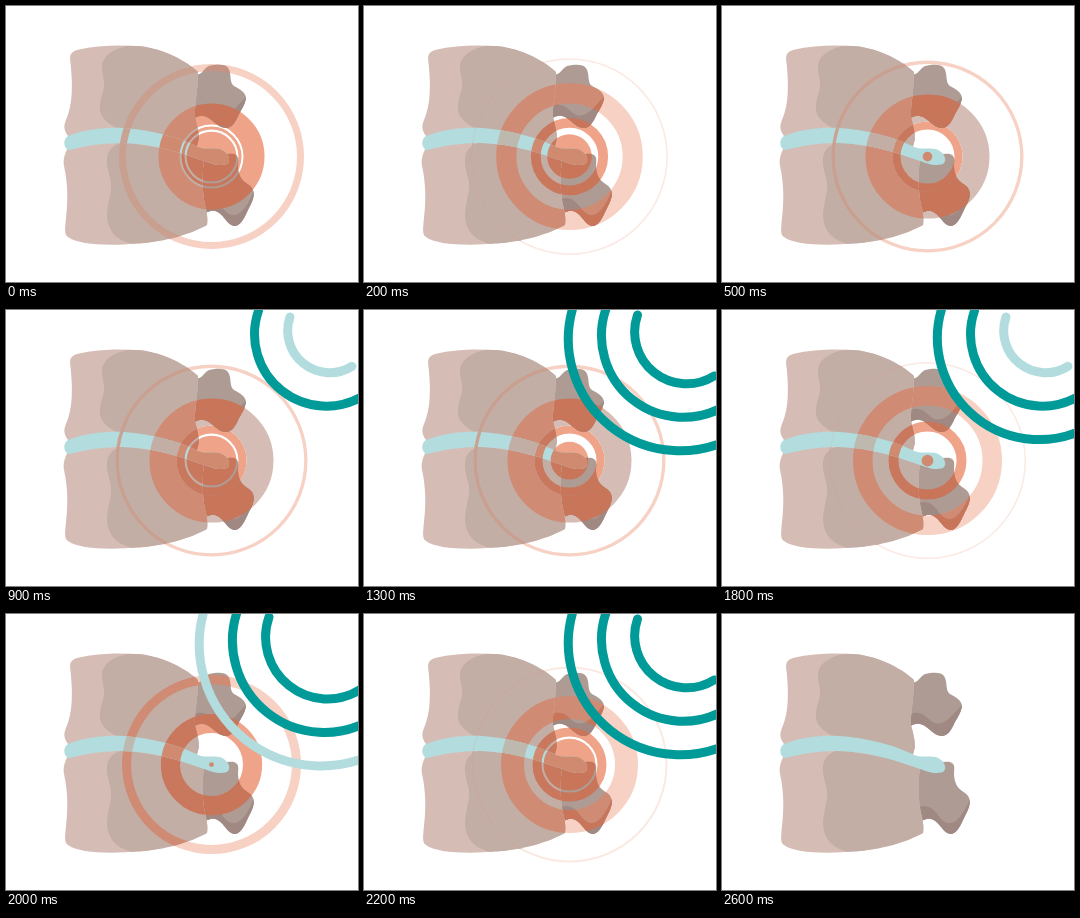
An HTML page that plays this animation: 352 by 276 pixels, repeating every 4.6 s.

```html
<!DOCTYPE html>
<html lang="en">
<head>
<meta charset="utf-8">
<title>Spine pain waves</title>
<style>
html, body { margin: 0; width: 100%; height: 100%; overflow: hidden; background: #fff; }
svg { display: block; width: 100%; height: 100%; }
</style>
</head>
<body>
<svg id="stage" viewBox="0 0 352 276">
  <defs>
    <path id="upper" d="M64 52Q64 46 71 44C92 39 112 39 130 40C153 41 178 53 192 66C192 86 188 102 189 111C191 118 193 126 193 133L190 144H64L62 130C57 123 58 119 60 114C67 98 67 78 64 52Z"/>
    <path id="lower" d="M64 138C58 148 57 154 58 160C62 178 62 195 60 212C59 222 58 229 62 231C72 239 104 240 130 237.5C160 236.5 186 227 201 219C202 213 201 207 199 199C196 185 196 168 198 154L190 143L118 130Z"/>
    <path id="upperProc" d="M186 69C197 70 197 63 203 60C212 58 219 58 222 62C226 68 223 77 228 80C234 83 240 87 240 92C239 99 235 104 232 110C229 117 225 122 220 122C211 122 207 112 198 110C192 109 190 112 186 113Z"/>
    <path id="lowerProc" d="M193 155L213 153C216 149 223 147 228 148C234 150 232 155 232 161C233 172 237 175 243 179C249 183 249 190 245 198C240 207 237 218 230 220C221 221 218 207 209 205C204 204 202 207 197 207Z"/>
    <path id="upperShade" d="M186 101C198 95 204 103 209 107C222 116 231 99 241 90V125H186Z"/>
    <path id="lowerShade" d="M193 195C204 188 211 194 216 201C227 217 239 209 249 182V222H193Z"/>
    <path id="disc" d="M62 130C80 123 100 121 118 122C145 124 168 130 188 139C198 145 206 141 214 143C222 146 226 154 221 158C213 161 204 157 198 155C175 147 150 138 116 137C96 137 78 140 64 144C58 144 56 134 62 130Z"/>
    <clipPath id="procClip"><use href="#upperProc"/><use href="#lowerProc"/></clipPath>
    <clipPath id="shadeClip" clip-path="url(#procClip)"><use href="#upperShade"/><use href="#lowerShade"/></clipPath>
    <clipPath id="bodyClip"><use href="#upper"/><use href="#lower"/></clipPath>
    <clipPath id="discClip"><use href="#disc"/></clipPath>
  </defs>
  <g id="onWhite"></g>
  <g fill="#ae9b93"><use href="#upperProc"/><use href="#lowerProc"/></g>
  <g id="onProc" clip-path="url(#procClip)"></g>
  <g clip-path="url(#procClip)" fill="#a08983"><use href="#upperShade"/><use href="#lowerShade"/></g>
  <g id="onShade" clip-path="url(#shadeClip)"></g>
  <g fill="#d5bdb5"><use href="#upper"/><use href="#lower"/></g>
  <g clip-path="url(#bodyClip)" fill="#c3aea6">
    <path d="M133 38C112 40 96 48 96 61C96 69 99 76 98 82C96 90 93 96 94 104C95 112 102 118 114 124L200 146V38Z"/>
    <path d="M118 136C104 139 100 147 101 158C102 168 106 174 105 183C104 192 101 200 101 210C102 224 109 236 133 239L204 224V150Z"/>
  </g>
  <g id="onBody" clip-path="url(#bodyClip)"></g>
  <use href="#disc" fill="#b2dcde"/>
  <g id="onDisc" clip-path="url(#discClip)"></g>
  <g id="signal" fill="none" stroke-width="9" stroke-linecap="round"></g>
</svg>
<script>
const LOOP = 4600, STEP = 100, LAST = 26;
const NS = "http://www.w3.org/2000/svg";
const TEAL = "#009a98", PALE = "#b2dcde";

// Wave colours on each surface.
const surfaces = {
  onWhite: { strong: "#efa388", dull: "#d5bdb5", soft: "#f7d1c4", thin: "#f7d1c4", faint: "#fbe9e3" },
  onProc: { strong: "#c8755a", dull: "#c8755a", soft: "#cf8b74", thin: "#c49383", faint: "#b39d94" },
  onShade: { strong: "#c8755a", dull: "#c8755a", soft: "#c8755a", thin: "#c49383", faint: "#a98f87" },
  onBody: { strong: "#c9785e", first: "#cf8b74", dull: "#cf8b74", soft: "#cf8b74", thin: "#c99f90", faint: "#c6aaa0" },
  onDisc: { strong: "#d08a70", dull: "#c3aea6", soft: "#bdb9af", thin: "#c9a294", faint: "#b8d4d3" }
};

// Step, wave progress (6 per wave), dot progress (1 per pulse).
const tempo = [
  [0, 0, 0.92], [5, 7, 3.18], [9, 13, 4.92], [13, 19, 6.7],
  [18, 27, 9.22], [22, 32, 10.96], [25, 35.5, 12.3]
];

// Wave age, outer radius, inner radius.
const growth = [
  [0, 30, 27], [1, 35, 27], [2, 37, 28], [3, 39, 29], [6, 53, 32], [7, 62, 35],
  [8, 68.5, 45.5], [9, 74.5, 55], [12, 92.5, 85.5], [13, 96, 92.7], [14, 98, 96], [15, 98.5, 97]
];

function add(parent, tag, attrs = {}) {
  const el = document.createElementNS(NS, tag);
  set(el, attrs);
  return parent.appendChild(el);
}

function set(el, attrs) {
  for (const name in attrs) el.setAttribute(name, attrs[name]);
}

function sample(keys, x) {
  let i = 1;
  while (i < keys.length - 1 && keys[i][0] < x) i++;
  const [a, b] = [keys[i - 1], keys[i]];
  const p = Math.min(1, (x - a[0]) / (b[0] - a[0]));
  return a.slice(1).map((v, n) => v + (b[n + 1] - v) * p);
}

const layers = Object.entries(surfaces).map(([id, colors]) => {
  const group = document.getElementById(id);
  const rings = Array.from({ length: 4 }, () =>
    add(group, "circle", { cx: 205.5, cy: 150.6, fill: "none" }));
  return { group, colors, rings };
});
const signal = document.getElementById("signal");
const arcs = [0, 1, 2].map(() => add(signal, "path"));

function tone(age) {
  if (age < 6) return "strong";
  if (age < 6.5) return "first";
  if (age < 7.5) return "dull";
  if (age < 12) return "soft";
  return age < 13.5 ? "thin" : "faint";
}

function drawRing(index, outer, inner, kind) {
  for (const { rings, colors } of layers) {
    set(rings[index], {
      r: (outer + inner) / 2,
      "stroke-width": outer - inner,
      stroke: colors[kind] || colors.strong
    });
  }
}

function drawWaves(step) {
  const [wave, dot] = sample(tempo, step);
  drawRing(0, 27 * (dot % 1), 0, "strong");
  for (let n = 0; n < 3; n++) {
    const age = wave % 6 + 6 * n;
    const [outer, inner] = age > 15.5 ? [0, 0] : sample(growth, age);
    drawRing(n + 1, outer, inner, tone(age));
  }
}

function arcPath(k) {
  const cx = 323.7 - 1.1 * k, cy = 20.7 + 1.2 * k, r = 42 + 9.95 * k;
  const point = deg => {
    const a = deg * Math.PI / 180;
    return `${cx + r * Math.cos(a)} ${cy + r * Math.sin(a)}`;
  };
  return `M${point(58)}A${r} ${r} 0 0 1 ${point(199)}`;
}

function drawSignal(step) {
  const age = step - 6;
  arcs.forEach((arc, j) => {
    const k = (age % 3) + 3 * j;
    const shown = age >= 0 && k <= age;
    set(arc, {
      d: shown ? arcPath(k) : "",
      stroke: k === 0 || k === 8 ? PALE : TEAL
    });
  });
}

function draw(time) {
  const step = Math.min(LAST, Math.floor((time % LOOP) / STEP));
  const show = step < LAST ? "inline" : "none";
  for (const { group } of layers) group.style.display = show;
  signal.style.display = show;
  if (step < LAST) {
    drawWaves(step);
    drawSignal(step);
  }
}

const start = performance.now();
function tick() {
  draw(performance.now() - start);
  requestAnimationFrame(tick);
}
tick();
</script>
</body>
</html>
```
